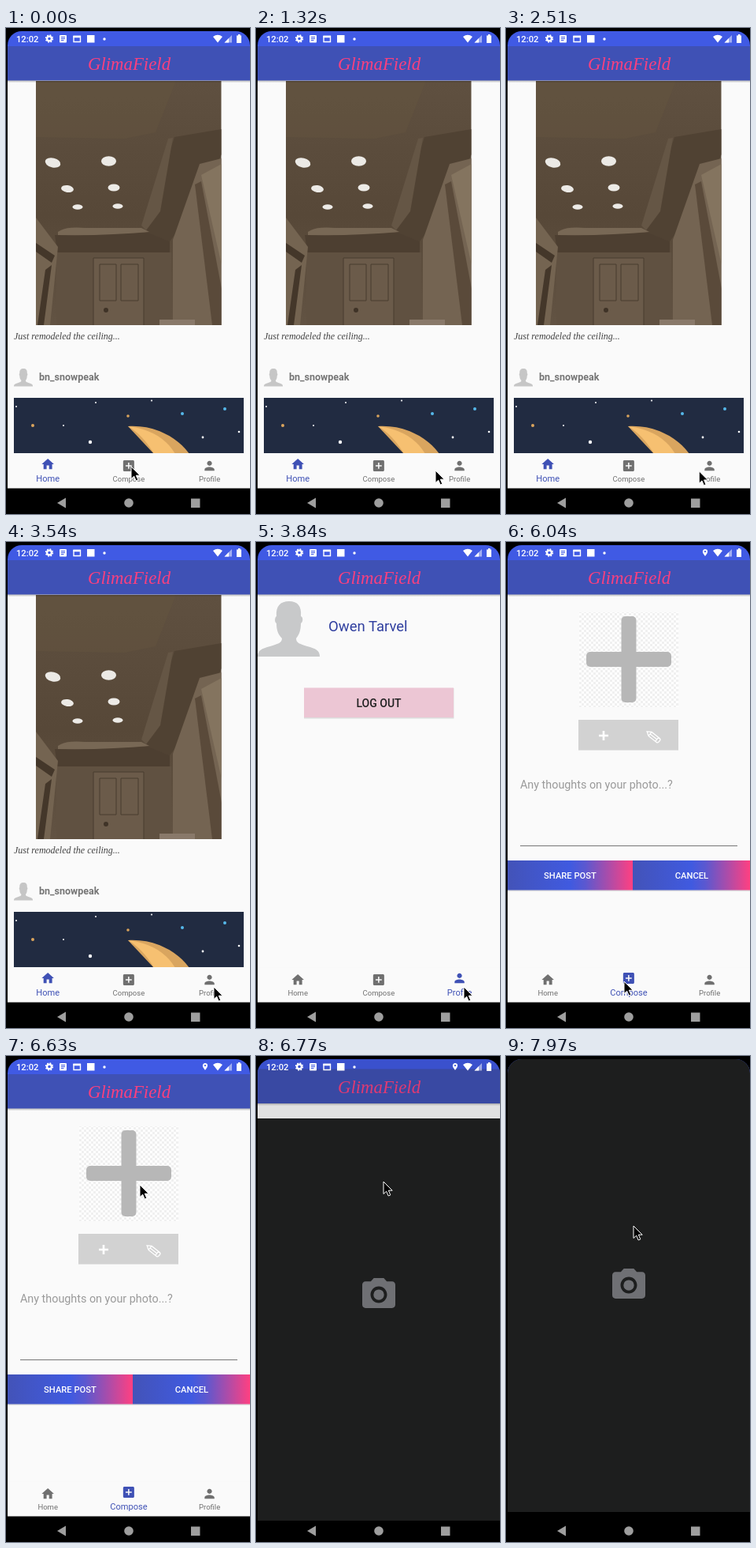
Animation, 310 px wide and 615 px high, one loop 8 s. Source, as an HTML page:

```html
<!DOCTYPE html>
<html lang="en">
<head>
<meta charset="utf-8">
<style>
  html, body { margin: 0; width: 100%; height: 100%; overflow: hidden; background: #000; }
  svg { display: block; width: 310px; height: 615px; font-family: Roboto, sans-serif; }
  .script { font-family: "Liberation Serif", serif; font-style: italic; }
  .mid { text-anchor: middle; }
  .medium { font-weight: 500; }
</style>
</head>
<body>
<svg viewBox="0 0 310 615">
  <defs>
    <clipPath id="screen"><path d="M2 615V22A18 18 0 0 1 20 4H292A18 18 0 0 1 310 22V615Z"/></clipPath>
    <clipPath id="photo"><path d="M38 67H273.500V376H38Z"/></clipPath>
    <clipPath id="night"><path d="M10 468H302V538H10Z"/></clipPath>
    <linearGradient id="fade">
      <stop stop-color="#4353b8"/><stop offset=".5" stop-color="#405ae0"/>
      <stop offset=".62" stop-color="#5b58d0"/><stop offset="1" stop-color="#ff4081"/>
    </linearGradient>
    <linearGradient id="ceiling" x2="0" y2="1">
      <stop stop-color="#5f5040"/><stop offset=".55" stop-color="#574838"/><stop offset="1" stop-color="#625343"/>
    </linearGradient>
    <linearGradient id="shade" x2="0" y2="1">
      <stop stop-color="#000" stop-opacity=".25"/><stop offset="1" stop-color="#000" stop-opacity="0"/>
    </linearGradient>
    <pattern id="checker" width="6" height="6" patternUnits="userSpaceOnUse">
      <path fill="#fff" d="M0 0H6V6H0Z"/><path fill="#f0f0f0" d="M0 0H3V3H0ZM3 3H6V6H3Z"/>
    </pattern>
    <path id="avatar" d="M0 70C0 62 5 60 16 57C25 54 31 53 31 47C26 42 24 36 24 28C21 26 22 20 24 19C23 6 29 0 40 0C51 0 56 6 55 19C58 20 58 26 55 28C55 36 53 42 49 47C49 53 54 54 63 57C74 60 79 62 79 70Z"/>
    <path id="Home" d="M10 20v-6h4v6h5v-8h3L12 3 2 12h3v8z"/>
    <path id="Compose" d="M19 3H5c-1.100 0-2 .9-2 2v14c0 1.100.9 2 2 2h14c1.100 0 2-.9 2-2V5c0-1.100-.9-2-2-2zm-2 10h-4v4h-2v-4H7v-2h4V7h2v4h4v2z"/>
    <path id="Profile" d="M12 12c2.210 0 4-1.790 4-4s-1.790-4-4-4-4 1.790-4 4 1.790 4 4 4zm0 2c-2.670 0-8 1.340-8 4v2h16v-2c0-2.660-5.330-4-8-4z"/>
  </defs>

  <g clip-path="url(#screen)">
    <path fill="#405ae4" d="M0 0H310V40H0Z"/>
    <g id="app">
      <path fill="#fafafa" d="M0 66H310V600H0Z"/>

      <g id="home">
        <g clip-path="url(#photo)">
          <path fill="url(#ceiling)" d="M38 67H274V376H38Z"/>
          <path fill="#65563f" opacity=".45" d="M38 67H216L190 132L150 140L38 138Z"/>
          <path fill="#504233" d="M214 138L274 128V160L232 238L208 270L176 258Z"/>
          <path fill="#655645" d="M206 140L212 139L196 232L178 256L172 250Z"/>
          <path fill="#746452" d="M274 165L246 172L212 268V376H274Z"/>
          <path fill="#5a4a3a" d="M240 198L248 194L274 330V376H262Z"/>
          <path fill="#84745f" d="M248 186L274 172V300Z"/>
          <path fill="#4d3f31" d="M62 262L180 259L208 270V290H66Z"/>
          <path fill="#786855" d="M66 258Q75 251 100 253H172L182 258Q130 263 66 262Z"/>
          <path fill="#605141" d="M64 284H210V376H64Z"/>
          <path fill="#6b5b4a" stroke="#493c2e" d="M111 291H175V377H111ZM119 299H140V345H119ZM146 299H168V345H146Z"/>
          <path fill="#746451" d="M38 240L66 277L56 376H38Z"/>
          <path fill="#44372a" d="M38 272L62 288L58 297L38 283ZM50 306L58 300L48 376H40Z"/>
          <path fill="#89796a" d="M195 369H240V376H195Z"/>
          <circle cx="127" cy="357" r="3" fill="#3f3327"/>
          <g fill="#eceae6">
            <ellipse cx="59.500" cy="170.500" rx="10" ry="6" transform="rotate(14 59.500 170.500)"/>
            <ellipse cx="130.500" cy="168.500" rx="9.500" ry="6.200"/>
            <ellipse cx="78" cy="203.500" rx="8" ry="4.500" transform="rotate(8 78 203.500)"/>
            <ellipse cx="137" cy="202" rx="7.500" ry="4.500"/>
            <ellipse cx="91" cy="226.500" rx="6.500" ry="3.300"/>
            <ellipse cx="142" cy="225.500" rx="6.500" ry="3.200"/>
          </g>
        </g>
        <text class="script" x="10" y="394" font-size="12" fill="#444">Just remodeled the ceiling...</text>
        <use href="#avatar" fill="#c6c6c6" transform="translate(10 431) scale(.305 .32)"/>
        <text x="42" y="446" font-size="12.500" font-weight="700" fill="#757575">bn_snowpeak</text>
        <g clip-path="url(#night)">
          <path fill="#212b41" d="M10 468H302V538H10Z"/>
          <path fill="#d9a55f" d="M155 504C188 502 217 517 233 539H188Z"/>
          <path fill="#f6c071" d="M155 504C184 507 205 521 215 539H188C181 526 169 512 155 504Z"/>
          <g id="stars"></g>
        </g>
      </g>

      <g id="profile">
        <use href="#avatar" x="2" y="75" fill="#c8c9ca"/>
        <text x="92" y="113" font-size="18.500" fill="#303f9f">Owen Tarvel</text>
        <path fill="#ddd" d="M61 185H251.500V223.500H61Z"/>
        <path fill="#ecc6d4" d="M61 184.500H251V222H61Z"/>
        <text class="mid medium" x="156" y="209" font-size="14" fill="#212121">LOG OUT</text>
      </g>

      <g id="compose">
        <path fill="url(#checker)" d="M93 89H219V209H93Z"/>
        <g fill="#b7b7b7">
          <rect x="146.500" y="94" width="19" height="109" rx="5"/>
          <rect x="102" y="139" width="108" height="19" rx="5"/>
        </g>
        <path fill="#d2d2d2" d="M92 225H219V263.500H92Z"/>
        <path stroke="#fff" stroke-width="2.600" d="M118 245H130M124 239V251"/>
        <g fill="none" stroke="#fff" stroke-width="1.300" transform="translate(187 246) rotate(38)">
          <path d="M-10 0L-5 -3.200H8Q10 -3.200 10 0T8 3.200H-5ZM-5 -3.200V3.200M-5 0H6M6 -3V3"/>
        </g>
        <text x="18" y="312" font-size="14.350" fill="#9a9a9a">Any thoughts on your photo...?</text>
        <path stroke="#777" d="M18 384.500H294"/>
        <path fill="#ddd" d="M2 440H310V442H2Z"/>
        <rect x="2" y="403" width="159" height="37.500" fill="url(#fade)"/>
        <rect x="161" y="403" width="149" height="37.500" fill="url(#fade)"/>
        <g class="mid medium" font-size="11.200" fill="#fff">
          <text x="81.500" y="426">SHARE POST</text><text x="236" y="426">CANCEL</text>
        </g>
      </g>

      <path fill="#fafafa" d="M0 538.500H310V600H0Z"/>
      <g id="tabs" class="mid"></g>
      <path fill="#3f51b5" d="M0 23H310V66.500H0Z"/>
      <path fill="url(#shade)" d="M0 66.500H310V69.500H0Z"/>
      <text class="script mid" x="156.500" y="53" font-size="22.800" fill="#f9407f">GlimaField</text>
    </g>

    <path id="dim" fill="#000" opacity=".1" d="M0 0H310V600H0Z"/>

    <g fill="#fff">
      <text class="medium" x="13" y="18" font-size="11.200">12:02</text>
      <g fill="none" stroke="#fff">
        <circle cx="55" cy="13.500" r="2.900" stroke-width="2.200"/>
        <circle cx="55" cy="13.500" r="4.400" stroke-width="1.600" stroke-dasharray="1.730"/>
        <path stroke-width="1.400" d="M86 10.500H94.500V17.500H86Z"/>
        <path stroke-width="2.400" d="M85.500 11H95"/>
      </g>
      <rect x="68" y="9" width="9" height="9.500" rx="1"/>
      <path stroke="#405ae4" d="M70 11.500H75M70 13.500H75M70 15.500H73.500"/>
      <rect x="103" y="9" width="9.500" height="9.500"/>
      <circle cx="125" cy="14" r="1.700"/>
      <path d="M263 11Q269 6.500 275 11L269 18.500ZM283 13V18.500H277.500Z"/>
      <path opacity=".5" d="M287 9V18.500H277.500Z"/>
      <path d="M293 9.500H295V8H297.500V9.500H299V19H293Z"/>
      <path id="pin" transform="translate(247.600 8) scale(.45)" fill-rule="evenodd" d="M12 2C8 2 5 5 5 9c0 5.200 7 13 7 13s7-7.800 7-13c0-4-3-7-7-7zm0 9.500a2.500 2.500 0 1 1 0-5 2.500 2.500 0 0 1 0 5z"/>
    </g>

    <g id="camera">
      <path id="sheet" fill="#1d1e1e" d="M0 0H310V620H0Z"/>
      <g id="lens" fill="#6f7074">
        <path d="M9 2L7.170 4H4c-1.100 0-2 .9-2 2v12c0 1.100.9 2 2 2h16c1.100 0 2-.9 2-2V6c0-1.100-.9-2-2-2h-3.170L15 2H9zm3 15c-2.760 0-5-2.240-5-5s2.240-5 5-5 5 2.240 5 5-2.240 5-5 5z"/>
        <circle cx="12" cy="12" r="3.200"/>
      </g>
    </g>
  </g>

  <path id="bar" d="M0 0H310V60H0Z"/>
  <g fill="#9e9e9e">
    <path d="M65 601L76 594.500V607.500Z"/><circle cx="156" cy="601" r="5.800"/><path d="M235 595.500H246.500V607H235Z"/>
  </g>
  <path id="cursor" stroke="#fff" stroke-linejoin="round" d="M0 0V15.500L3.700 12.200 6.200 18 8.800 16.900 6.300 11.200H11.200Z"/>
</svg>

<script>
const $ = id => document.getElementById(id);
const show = (id, on) => $(id).setAttribute('display', on ? 'inline' : 'none');
const move = (id, x, y, scale = 1) =>
  $(id).setAttribute('transform', `translate(${x} ${y}) scale(${scale})`);

const LOOP = 8000, STEP = 147.2;
const PROFILE_AT = 26, COMPOSE_AT = 41, CAMERA_AT = 46;

// Pointer path: step, x, y
const path = [
  [0, 159, 555], [1, 159, 555], [2, 165, 555], [3, 165, 555], [9, 228, 560], [11, 230, 562],
  [14, 239, 560], [15, 239, 560], [23, 264, 563], [30, 264, 563], [31, 264, 556], [34, 174, 200],
  [35, 167, 298], [38, 148, 556], [41, 150, 556], [45, 170, 163], [46, 162, 159], [52, 162, 159],
  [54, 162, 215]
];

// Camera opening: sheet top, app offset, lens top, bottom bar top
const opening = [[79, -6.5, 276.900, 588], [20, -10, 267, 583], [0, -10, 264.900, 577]];

const starColors = { w: '#fff', o: '#dba45c', b: '#55b9ea' };
$('stars').innerHTML = [
  [34, 503, 2, 'o'], [155, 491, 1.800, 'o'], [224, 488, 2, 'b'], [278, 482, 2, 'b'],
  [107, 524, 2.200, 'w'], [73, 503, 1, 'w'], [114, 474, 1, 'w'], [185, 471.500, 1.100, 'w'],
  [296, 511, 1.300, 'w'], [250, 518, 1.400, 'w'], [13, 479, 1, 'w']
].map(([x, y, r, c]) => `<circle cx="${x}" cy="${y}" r="${r}" fill="${starColors[c]}"/>`).join('');

function drawTabs(active) {
  $('tabs').innerHTML = ['Home', 'Compose', 'Profile'].map((name, i) => {
    const on = name.toLowerCase() === active, x = 53.200 + i * 102.700;
    return `<g fill="${on ? '#3f51b5' : '#707070'}">
      <use href="#${name}" transform="translate(${x - 9.400} ${on ? 542.600 : 544.600}) scale(.78)"/>
      <text x="${x}" y="574" font-size="${on ? 11.100 : 9.500}">${name}</text></g>`;
  }).join('');
}

function pointerAt(step) {
  const i = Math.max(1, path.findIndex(p => p[0] >= step));
  const [a, b] = [path[i - 1], path[i]];
  const k = (step - a[0]) / (b[0] - a[0]);
  return [1, 2].map(n => a[n] + (b[n] - a[n]) * k);
}

function draw(step) {
  const page = step < PROFILE_AT ? 'home' : step < COMPOSE_AT ? 'profile' : 'compose';
  for (const id of ['home', 'profile', 'compose']) show(id, id === page);
  drawTabs(page);
  show('pin', page === 'compose');

  const open = step >= CAMERA_AT;
  const [sheet, app, lens, bar] = open ? opening[Math.min(step - CAMERA_AT, 2)] : [0, 0, 0, 582.500];
  show('camera', open);
  show('dim', open);
  move('app', 0, app);
  move('sheet', 0, sheet);
  move('lens', 130.800, lens, 2.100);
  move('bar', 0, bar);
  move('cursor', ...pointerAt(step));
}

let last = -1;
function tick() {
  const step = Math.min(54, Math.floor((performance.now() % LOOP + 10) / STEP));
  if (step !== last) draw(last = step);
  requestAnimationFrame(tick);
}
tick();
</script>
</body>
</html>
```
